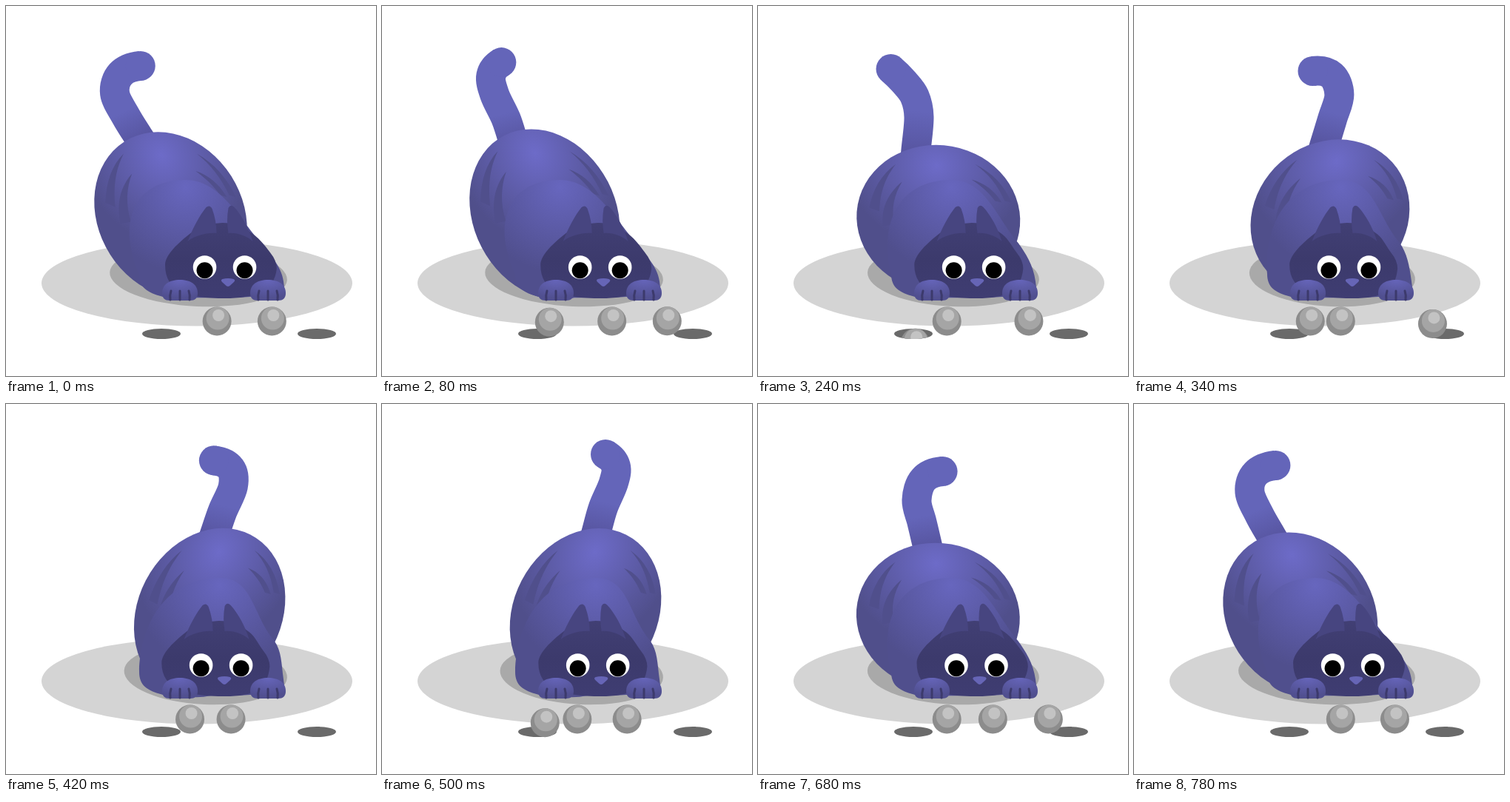
Animation, 500 px wide and 500 px high, one loop 0.8 s. Source, as an HTML page:

```html
<!DOCTYPE html>
<html lang="en">
<head>
<meta charset="utf-8">
<title>Cat and marbles</title>
<style>
  html, body { margin: 0; width: 100%; height: 100%; overflow: hidden; background: #fff; }
  svg { display: block; width: 100vw; height: 100vh; }
</style>
</head>
<body>
<svg viewBox="0 0 500 500">
  <defs>
    <radialGradient id="fur" gradientUnits="userSpaceOnUse" cx="0" cy="-.72" r="1.1">
      <stop offset="0" stop-color="#6d6bc8"/>
      <stop offset="1" stop-color="#504f8b"/>
    </radialGradient>
    <radialGradient id="chest" gradientUnits="userSpaceOnUse" cx="260" cy="245" r="115">
      <stop offset="0" stop-color="#6766be"/>
      <stop offset="1" stop-color="#504f8d"/>
    </radialGradient>
    <linearGradient id="tailFur" gradientUnits="userSpaceOnUse">
      <stop offset="0" stop-color="#5856a2"/>
      <stop offset="1" stop-color="#6465b9"/>
    </linearGradient>
    <linearGradient id="face" x1="0" y1="0" x2="0" y2="1">
      <stop offset="0" stop-color="#413f74"/>
      <stop offset=".5" stop-color="#3c3a6c"/>
      <stop offset="1" stop-color="#3f3d72"/>
    </linearGradient>
    <radialGradient id="pawFur" cx=".5" cy="0" r=".9">
      <stop offset="0" stop-color="#6665ba"/>
      <stop offset="1" stop-color="#504f8f"/>
    </radialGradient>
    <clipPath id="ground">
      <rect width="500" height="443"/>
      <ellipse cx="210" cy="443" rx="26" ry="7"/>
      <ellipse cx="420" cy="443" rx="26" ry="7"/>
    </clipPath>
    <g id="ball">
      <circle r="19.5" fill="#8c8c8c"/>
      <circle cx="1" cy="-4" r="15.5" fill="#a5a5a5"/>
      <circle cx="2" cy="-8" r="8" fill="#c3c3c3"/>
    </g>
    <g id="paw">
      <path d="M-24 3C-24-9-14-15 0-15S24-9 24 3C24 10 20 13 14 13H-14C-20 13-24 10-24 3Z" fill="url(#pawFur)"/>
      <path d="M-12 0Q-14 6-13 12M0 0V12M12 0Q14 6 13 12" fill="none" stroke="#3c3a6c" stroke-width="3" stroke-linecap="round"/>
    </g>
  </defs>

  <ellipse cx="258" cy="374.5" rx="210" ry="58" fill="#d4d4d4"/>
  <ellipse id="shadow" cy="365" ry="41" fill="#a9a9a9"/>
  <g fill="#6a6a6a">
    <ellipse cx="210" cy="443" rx="26" ry="7"/>
    <ellipse cx="420" cy="443" rx="26" ry="7"/>
  </g>

  <path id="tail" fill="none" stroke="url(#tailFur)" stroke-width="40" stroke-linejoin="round"/>
  <circle id="tip" r="20" fill="#6465b9"/>

  <g id="rump">
    <circle r="1" fill="url(#fur)"/>
    <g fill="#504f8c">
      <path d="M-.5-.74C-.68-.6-.79-.4-.84-.15L-.72-.1C-.7-.38-.63-.56-.5-.74Z"/>
      <path d="M-.43-.5C-.6-.35-.7-.15-.68 .1L-.54 .08C-.58-.13-.53-.33-.43-.5Z"/>
      <path d="M.47-.74C.68-.62 .82-.45 .9-.22L.82-.24C.74-.45 .64-.6 .47-.74Z"/>
      <path d="M.42-.53C.58-.48 .7-.38 .78-.22L.7-.24C.62-.36 .54-.44 .42-.53Z"/>
    </g>
  </g>
  <path id="torso" fill="url(#chest)"/>

  <g id="head">
    <path id="skull" fill="url(#face)"/>
    <g id="features">
      <g fill="#474580">
        <path d="M243 318C250 300 259 283 268 272Q273 268 276 274C280 285 282 296 282 307C268 306 254 310 243 318Z"/>
        <path d="M298 307C296 296 296 284 298 273Q301 267 306 272C316 283 325 299 331 318C321 310 310 306 298 307Z"/>
      </g>
      <g fill="#fff">
        <circle cx="266" cy="353" r="15.8"/>
        <circle cx="320" cy="353" r="15.8"/>
      </g>
      <circle cx="266" cy="357.2" r="11"/>
      <circle cx="320" cy="357.2" r="11"/>
      <path d="M290 369Q297.500 367 305 369Q308 370 305.500 373L300 378Q297.500 380 295 378L289.500 373Q287 370 290 369Z" fill="#6665b6"/>
    </g>
  </g>
  <use href="#paw" x="235" y="385"/>
  <use href="#paw" x="354" y="385"/>

  <g id="balls"></g>
</svg>

<script>
const LOOP = 800;
const $ = id => document.getElementById(id);
const set = (el, attrs) => { for (const k in attrs) el.setAttribute(k, attrs[k]); };
const mod = (a, n) => ((a % n) + n) % n;

// Smooth curve through rows of [time, value, value, ...]
function sample(keys, t) {
  const last = keys.length - 1;
  t = Math.min(Math.max(t, keys[0][0]), keys[last][0]);
  let i = 0;
  while (i < last - 1 && t > keys[i + 1][0]) i++;
  const a = keys[i], b = keys[i + 1], d = b[0] - a[0], u = (t - a[0]) / d;
  const slope = (n, k) => {
    const p = keys[Math.max(n - 1, 0)], q = keys[Math.min(n + 1, last)];
    return (q[k] - p[k]) / (q[0] - p[0]);
  };
  const u2 = u * u, u3 = u2 * u;
  return a.slice(1).map((v, j) => {
    const k = j + 1;
    return v * (2 * u3 - 3 * u2 + 1) + b[k] * (3 * u2 - 2 * u3)
      + d * (slope(i, k) * (u3 - 2 * u2 + u) + slope(i + 1, k) * (u3 - u2));
  });
}

// Tail spine from base to tip as x, y pairs
const poses = [
  [0, 180, 178, 162, 149, 147, 118, 155, 92, 182, 81],
  [160, 182, 190, 180, 155, 166, 122, 150, 97, 150, 74],
  [240, 213, 195, 217, 150, 211, 122, 196, 102, 179, 85],
  [340, 258, 185, 268, 152, 277, 120, 267, 94, 241, 88],
  [500, 290, 172, 299, 140, 313, 107, 316, 84, 302, 68],
  [680, 229, 190, 222, 160, 215, 130, 224, 102, 250, 91],
  [780, 187, 180, 170, 150, 157, 119, 165, 94, 192, 83]
];
const shift = (row, by) => [row[0] + by, ...row.slice(1)];
const tailKeys = [shift(poses[6], -LOOP), ...poses, shift(poses[0], LOOP), shift(poses[1], LOOP)];

// One marble: pops up on the left, rolls right, drops in
const roll = [
  [-20, 207, 474], [0, 212, 456], [40, 220, 431], [100, 238, 426], [140, 243, 426],
  [220, 255, 426], [320, 279, 426], [440, 317, 426], [560, 359, 426], [660, 392, 426],
  [680, 403, 429], [720, 418, 449], [760, 422, 471]
];
const balls = [20, 240, 460].map(start => {
  const ns = "http://www.w3.org/2000/svg";
  const box = document.createElementNS(ns, "g");
  const use = document.createElementNS(ns, "use");
  set(use, { href: "#ball" });
  box.append(use);
  $("balls").append(box);
  return { start, box, use };
});

function drawTail(t) {
  const v = sample(tailKeys, t), pts = [];
  for (let i = 0; i < v.length; i += 2) pts.push([v[i], v[i + 1]]);
  const [base, next] = pts, end = pts.length - 1, tip = pts[end];
  set($("tailFur"), { x1: base[0], y1: base[1], x2: next[0], y2: next[1] - 8 });
  // Continue the curl past the tip so that it stays round
  const beyond = [0, 1].map(k => 3 * tip[k] - 3 * pts[end - 1][k] + pts[end - 2][k]);
  pts.unshift([0, 1].map(k => base[k] + (base[k] - next[k]) * 0.6));
  let d = "M" + pts[0];
  for (let i = 0; i < pts.length - 1; i++) {
    const p = pts[i], q = pts[i + 1];
    const before = pts[i - 1] || p, after = pts[i + 2] || beyond;
    const c1 = [0, 1].map(k => p[k] + (q[k] - before[k]) / 6);
    const c2 = [0, 1].map(k => q[k] - (after[k] - p[k]) / 6);
    d += `C${c1} ${c2} ${q}`;
  }
  set($("tail"), { d });
  set($("tip"), { cx: tip[0], cy: tip[1] });
}

function drawBody(s) {
  const cx = 248 - 28.5 * s, cy = 287.5 - 6 * s * s;
  const w = 110.7 - 9.3 * s * s, h = cy - 188.3 + 22.5 * s * s;
  const lean = 2130 * s / h;
  set($("rump"), { transform: `matrix(${Math.sqrt(w * w - lean * lean)} 0 ${lean} ${h} ${cx} ${cy})` });

  const left = 149.5 - 10.5 * s, mid = (left + 380) / 2;
  set($("shadow"), { cx: mid, rx: 380 - mid, transform: `rotate(2.5 ${mid} 365)` });

  const top = 265 - 25 * s, side = 353 - 10 * s;
  set($("chest"), { cx: top });
  set($("torso"), {
    d: `M180 362C${166 - 16 * s} 300 ${top - 75} 235 ${top} 235C${top + 45} 235 ${side - 30} 284 ${side} 320` +
       `C${side + 10} 334 372 350 375 372L377 388Q340 394 296 394Q240 395 212 393C190 387 180 380 180 362Z`
  });
}

function drawHead(h) {
  const l = 212.6 + 2.5 * h, r = 362 + 5 * h, m = 290 + 2.5 * h;
  set($("skull"), {
    d: `M${l} 350C${l} 336 ${l + 18} 320 ${m - 43} 307Q${m - 22} 293 ${m} 293Q${m + 22} 293 ${m + 38} 306` +
       `C${m + 48} 312 ${r - 18} 322 ${r - 10} 333Q${r - 1} 344 ${r - 1} 355C${r - 4} 386 335 395 296 395` +
       `C245 395 ${l} 386 ${l} 350Z`
  });
  set($("features"), { transform: `translate(${2.6 * h} 0)` });
}

function drawBalls(t) {
  for (const { start, box, use } of balls) {
    const [x, y] = sample(roll, mod(t - start + 20, LOOP) - 20);
    set(use, { x, y });
    set(box, { "clip-path": y > 431.5 ? "url(#ground)" : "none" });
  }
}

function draw(t) {
  const wave = peak => Math.cos((t - peak) / LOOP * 2 * Math.PI);
  drawTail(t);
  drawBody(wave(60));
  drawHead(wave(-30));
  drawBalls(t);
}

const begin = performance.now();
function tick() {
  draw(mod(performance.now() - begin, LOOP));
  requestAnimationFrame(tick);
}
draw(0);
requestAnimationFrame(tick);
</script>
</body>
</html>
```
